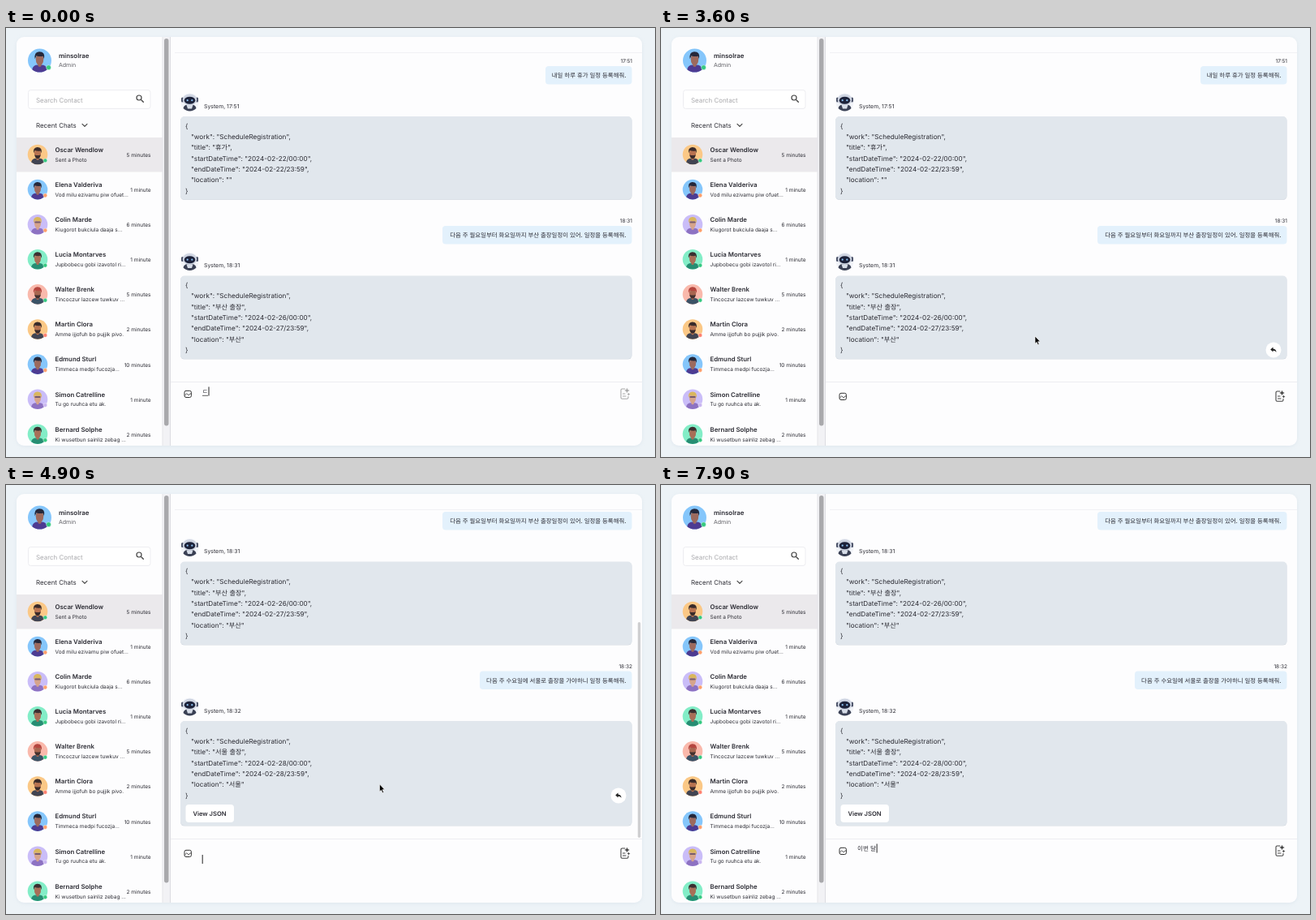
These frames come from a looping animation (800 by 529 pixels, 8 s). An HTML page:

```html
<!DOCTYPE html>
<html lang="ko">
<head>
<meta charset="utf-8">
<title>Schedule chat</title>
<style>
html, body { margin: 0; height: 100%; overflow: hidden; background: #edf3f7; }
svg { display: block; width: 100vw; height: 100vh; }
text { font-family: Inter, 'Noto Sans CJK KR', 'Noto Sans CJK', sans-serif; white-space: pre; text-rendering: geometricPrecision; }
</style>
</head>
<body>
<svg id="stage" viewBox="0 0 800 529"></svg>
<script>
const LOOP = 8000, SEND = 3550, ASK = 3650, REPLY = 3900, RETYPE = 6100;
const INK = '#2b2b33', GREEN = '#35c981', ORANGE = '#ffa06b';

const text = (x, y, size, str, attrs = '') =>
  `<text x="${x}" y="${y}" font-size="${size}" fill="${INK}" ${attrs}>${str}</text>`;
const rect = (x, y, w, h, r, fill, attrs = '') =>
  `<rect x="${x}" y="${y}" width="${w}" height="${h}" rx="${r}" fill="${fill}" ${attrs}/>`;
const circle = (x, y, r, fill, attrs = '') =>
  `<circle cx="${x}" cy="${y}" r="${r}" fill="${fill}" ${attrs}/>`;
const path = (d, attrs = '') =>
  `<path d="${d}" fill="none" stroke="#444" stroke-linecap="round" stroke-linejoin="round" ${attrs}/>`;
const END = 'text-anchor="end"', BOLD = 'font-weight="600"';

// Avatars: backdrop, hair, skin, shirt, beard or glasses colour
const LOOKS = {
  amber: ['#fbc886', '#3a2b2a', '#b87350', '#414452', '#3a2b2a'],
  blue: ['#85c6fb', '#25283b', '#9c6a5e', '#4d3b92', '#9c6a5e'],
  lilac: ['#cabdf8', '#d9b75d', '#d6a48c', '#8d72c2', '#775c6c'],
  mint: ['#83edc7', '#3b3031', '#a86f58', '#278d73', '#a86f58'],
  coral: ['#f9b9ac', '#b5463f', '#a86650', '#3b5266', '#43302f'],
};

function avatar(x, y, r, look, dot) {
  const [back, hair, skin, shirt, detail] = LOOKS[look];
  const face = look === 'lilac'
    ? rect(-.3, -.3, .6, .16, .07, detail)
    : `<path d="M-.3 .02Q0 .16 .3 .02Q.26 .42 0 .42Q-.26 .42-.3 .02" fill="${detail}"/>`;
  return `<g transform="translate(${x} ${y}) scale(${r})">${circle(0, 0, 1, back)}
    <path d="M-.64 .77Q-.58 .38-.15 .38H.15Q.58 .38 .64 .77A1 1 0 0 1-.64 .77" fill="${shirt}"/>
    ${rect(-.13, .18, .26, .36, .1, skin)}
    <ellipse cy="-.1" rx=".33" ry=".48" fill="${skin}"/>${face}
    <path d="M-.4-.12Q-.5-.7-.05-.74Q.5-.76 .38-.12L.28-.36Q0-.3-.28-.4Z" fill="${hair}"/></g>
    ${circle(x + r * .76, y + r * .6, r * .2, dot, 'stroke="#fff" stroke-width=".4"')}`;
}

const CONTACTS = [
  ['Oscar Wendlow', 'Sent a Photo', '5 minutes', 'amber', GREEN],
  ['Elena Valderiva', 'Vod milu ezivamu piw ofuet…', '1 minute', 'blue', ORANGE],
  ['Colin Marde', 'Kiugorot bukciula daaja s…', '6 minutes', 'lilac', ORANGE],
  ['Lucia Montarves', 'Jupbobecu gobi izavotol ri…', '1 minute', 'mint', GREEN],
  ['Walter Brenk', 'Tincoczur lazcew tuwkuv …', '5 minutes', 'coral', GREEN],
  ['Martin Clora', 'Amme ijjofuh bo pujjik pivo.', '2 minutes', 'amber', '#ff8170'],
  ['Edmund Sturl', 'Timmeca medpi fucozja…', '10 minutes', 'blue', ORANGE],
  ['Simon Catrelline', 'Tu go ruuhca etu ak.', '1 minute', 'lilac', '#c9b6f0'],
  ['Bernard Solphe', 'Ki wusetbun sainliz zebag …', '2 minutes', 'mint', GREEN],
];

const sidebar = () => avatar(41.5, 40, 14.5, 'blue', GREEN) +
  text(65, 36.6, 7.9, 'minsolrae', BOLD) +
  text(65, 48.3, 7, 'Admin', 'opacity=".75"') +
  rect(27.5, 76.5, 150.5, 23, 3, '#fff', 'stroke="#ededf1"') +
  text(37, 91.6, 7.9, 'Search Contact', 'opacity=".4"') +
  path('M167 89L169.3 91.3', 'stroke-width="1.4"') +
  circle(164, 86, 3, 'none', 'stroke="#444" stroke-width="1.2"') +
  text(37, 122.7, 7.9, 'Recent Chats') +
  path('M94 118.3L97 121.3L100 118.3', 'stroke-width="1.1"') +
  rect(13, 135, 180, 42.5, 0, '#ebe9ec') +
  CONTACTS.map(([name, note, ago, look, dot], i) => {
    const y = 156 + 43.1 * i;
    return avatar(39, y, 12.3, look, dot) + text(60.5, y - 3.2, 7.8, name, BOLD) +
      text(60.5, y + 8.7, 6.5, note) + text(178.5, y + 2.9, 6.5, ago, END);
  }).join('') +
  rect(193, 11, 10, 504, 0, '#f2f2f5') +
  rect(192.5, 11, 1, 504, 0, '#e6e6ea') + rect(202, 11, 1, 504, 0, '#dcdce1') +
  rect(195, 13, 5.5, 477.5, 2.7, '#a9a9ac');

const request = (top, left, time, str) => text(772, top - 3.7, 6.5, time, END) +
  rect(left, top, 771.5 - left, 22.5, 4, '#e3f1fc') +
  text(764.5, top + 14.1, 7.4, str, END + ' font-weight="500"');

const robot = y => `<g transform="translate(226.5 ${y})">${circle(0, 0, 11, '#f1f3f8')}
  <path d="M-8 7.5Q-7 2.5 0 2.5T8 7.5A11 11 0 0 1-8 7.5" fill="#3a4054"/>
  <path d="M-4 3.5H4L2.5 8H-2.5Z" fill="#d6dce7"/>
  ${rect(-10.5, -6, 3, 6, 1.5, '#4b5268')}${rect(7.5, -6, 3, 6, 1.5, '#4b5268')}
  <ellipse cy="-3" rx="8.7" ry="7" fill="#cfd5e2"/>
  <ellipse cy="-2.2" rx="6.8" ry="4.5" fill="#1c223a"/>
  ${circle(-2.8, -2.3, 1.1, '#8fc4f5')}${circle(2.8, -2.3, 1.1, '#8fc4f5')}</g>`;

const bubble = (top, h) => rect(215, top + .6, 556.5, h, 5, '#d3d9e1') + rect(215, top, 556.5, h, 5, '#e1e7ed');

function answer(top, h, time, title, from, to, place) {
  const lines = ['{', '"work": "ScheduleRegistration",', `"title": "${title}",`,
    `"startDateTime": "${from}/00:00",`, `"endDateTime": "${to}/23:59",`, `"location": "${place}"`, '}'];
  return robot(top - 17.5) + text(244, top - 10.2, 6.9, 'System, ' + time) + bubble(top, h) +
    lines.map((s, i) => text(i % 6 ? 228 : 221, top + 14.5 + 13.35 * i, 8.2, s)).join('');
}

const replyButton = (id, y) => `<g id="${id}">${circle(755, y, 9.5, '#fff')}
  <path d="M751.2 ${y - .4}l3.3-3v1.8q3.8 .3 4 4.4q-1.2-2-4-2v1.8z" fill="#222"/></g>`;

const thread = () => request(47, 665, '17:51', '내일 하루 휴가 일정 등록해줘.') +
  answer(109, 102.5, '17:51', '휴가', '2024-02-22', '2024-02-22', '') +
  request(244, 538, '18:31', '다음 주 월요일부터 화요일까지 부산 출장일정이 있어. 일정을 등록해줘.') +
  answer(305.5, 102.5, '18:31', '부산 출장', '2024-02-26', '2024-02-27', '부산') +
  replyButton('replyOld', 397) +
  `<g id="asked">${request(440.5, 584, '18:32', '다음 주 수요일에 서울로 출장을 가야하니 일정 등록해줘.')}</g>
  <g id="loading">${robot(484.5)}${bubble(502, 25.5)}${text(221, 517.5, 8.2, '...')}
    <rect id="progress" x="216" y="525.3" height="2.2" rx="1" fill="#4a6fa5"/></g>
  <g id="answered">${answer(502, 129, '18:32', '서울 출장', '2024-02-28', '2024-02-28', '서울')}
    ${rect(221.5, 605, 59.5, 22, 4, '#fff')}${text(251, 618.8, 7.6, 'View JSON', BOLD + ' text-anchor="middle"')}
    ${replyButton('replyNew', 594)}</g>`;

const composer = () => `<g id="icons">
  ${rect(220, 450.3, 8.4, 8.2, 2, 'none', 'stroke="#333"')}
  ${path('M220.5 456L222.8 453.8L225 455.8L228 453.5', 'stroke="#333" stroke-width=".9"')}
  <g id="sendIcon">${path('M763 448H759.5Q758 448 758 449.5V458.8Q758 460.3 759.5 460.3H765.5Q767 460.3 767 458.8V457.5M760.5 454H763M760.5 457H764', 'stroke-width="1.1"')}
    <path d="M765.5 446.7l1 2.3 2.3 1-2.3 1-1 2.3-1-2.3-2.3-1 2.3-1zM767.5 452.6l.6 1.4 1.4 .6-1.4 .6-.6 1.4-.6-1.4-1.4-.6 1.4-.6z" fill="#444"/></g>
  <g id="stopIcon">${circle(762, 454, 7, 'none', 'stroke="#555" stroke-width="1.6"')}${rect(759, 451, 6, 6, .6, '#444')}</g></g>
  ${text(242, 451, 7.6, '', 'id="typed"')}
  <path id="underline" stroke="#333" stroke-width=".8"/>
  <path id="caret" stroke="#222"/>`;

document.getElementById('stage').innerHTML = `
  <defs><clipPath id="card"><rect x="13" y="11" width="771" height="504" rx="9"/></clipPath>
  <clipPath id="view"><rect x="203" y="30.5" width="581" height="406"/></clipPath>
  <filter id="soft" x="-5%" y="-5%" width="110%" height="110%"><feGaussianBlur stdDeviation="2"/></filter></defs>
  ${rect(0, 0, 800, 529, 0, '#edf3f7')}
  ${rect(13, 12, 771, 504, 9, '#d5dfe8', 'filter="url(#soft)" opacity=".6"')}
  ${rect(13, 11, 771, 504, 9, '#fdfdfe')}
  <g clip-path="url(#card)">${sidebar()}
    ${rect(208, 30, 576, 1, 0, '#f1f1f4')}
    <g clip-path="url(#view)"><g id="thread">${thread()}</g></g>
    ${rect(203, 436, 581, 1, 0, '#ededf1')}
    <rect id="thumb" x="778.8" width="3.4" rx="1.7" fill="#b8b8bc"/>
    ${composer()}</g>
  <path id="arrow" d="M0 0V9.3L2.1 7.4L3.6 10.8L5.2 10.1L3.7 6.8H6.5Z" fill="#000" stroke="#fff" stroke-width=".7"/>
  <path id="beam" d="M-2.3-5.4Q0-5.4 0-4V4Q0 5.4-2.3 5.4M2.3-5.4Q0-5.4 0-4M0 4Q0 5.4 2.3 5.4M-1.2 1.8H1.2" fill="none" stroke="#222" stroke-width="1"/>`;

const el = {};
document.querySelectorAll('[id]').forEach(e => el[e.id] = e);
const show = (id, on) => el[id].setAttribute('visibility', on ? 'inherit' : 'hidden');
const set = (id, attrs) => { for (const k in attrs) el[id].setAttribute(k, attrs[k]); };

// Hangul input steps: each entry is [finished text, syllable being composed]
function keystrokes(str) {
  const BASE = 0xAC00, LEADS = 'ㄱㄲㄴㄷㄸㄹㅁㅂㅃㅅㅆㅇㅈㅉㅊㅋㅌㅍㅎ';
  const TAILS = [1, 2, 4, 7, 0, 8, 16, 17, 0, 19, 20, 21, 22, 0, 23, 24, 25, 26, 27];
  const glyph = code => String.fromCharCode(BASE + code);
  const steps = [];
  let done = '';
  for (const ch of str) {
    const code = ch.charCodeAt(0) - BASE;
    if (code < 0) {
      steps.push([done + ch, '']);
    } else {
      const lead = Math.floor(code / 588), tail = code % 28, open = code - tail;
      const prev = done.charCodeAt(done.length - 1) - BASE;
      // A new consonant first lands under an open syllable
      steps.push(prev >= 0 && prev % 28 === 0 && TAILS[lead]
        ? [done.slice(0, -1), glyph(prev + TAILS[lead])] : [done, LEADS[lead]]);
      if (Math.floor(code % 588 / 28) === 14) steps.push([done, glyph(open - 28)]);
      steps.push([done, glyph(open)]);
      if (tail) steps.push([done, ch]);
    }
    done += ch;
  }
  return steps;
}
const FIRST = keystrokes('다음 주 수요일에 서울로 출장을 가야하니 일정 등록해줘.');
const SECOND = keystrokes('이번 달');

const clamp = v => Math.max(0, Math.min(1, v));
const ease = v => v * v * (3 - 2 * v);

function drawInput(t) {
  const step = t < SEND ? FIRST[Math.min(FIRST.length - 1, Math.floor(t / 53.4))]
    : t >= RETYPE ? SECOND[Math.min(SECOND.length - 1, Math.floor((t - RETYPE) / 100))] : null;
  const [done, composing] = step || ['', ''];
  const width = s => { el.typed.textContent = s; return s ? el.typed.getComputedTextLength() : 0; };
  const from = 242 + width(done), to = 242 + width(done + composing);
  show('underline', composing && t < 7000);
  set('underline', { d: `M${from} 453.3H${to}` });
  const x = step ? to + 1 : 242.2;
  set('caret', { d: step ? `M${x} 442.5V453.5` : `M${x} 456V467` });
  show('caret', step ? t < 7400 || t >= 7900 : t >= ASK && Math.floor((t - 3600) / 500) % 2 === 0);
  set('icons', { transform: `translate(0 ${step ? -3 : 0})` });
}

function drawPointer(t) {
  const a = ease(clamp((t - 3600) / 100)), b = ease(clamp((t - 4800) / 500));
  const x = 461 + 6 * a - 62 * b, y = 380 - 23 * a + 112 * b;
  const seen = t >= SEND && t < RETYPE, typing = y > 436;
  show('arrow', seen && !typing);
  show('beam', seen && typing);
  set('arrow', { transform: `translate(${x} ${y})` });
  set('beam', { transform: `translate(${x} ${y})` });
  show('replyOld', seen && t < ASK);
  show('replyNew', seen && t >= REPLY && y < 420);
}

function render(t) {
  const asked = t >= ASK, answered = t >= REPLY, loading = asked && !answered;
  show('asked', asked);
  show('loading', loading);
  show('answered', answered);
  show('stopIcon', loading);
  show('sendIcon', !loading);
  set('sendIcon', { opacity: .45 + .55 * clamp(t / 300) });
  set('progress', { width: 13 + Math.max(0, t - 3700) * .4 });
  set('thread', { transform: `translate(0 ${answered ? -211 : asked ? -107.5 : 0})` });
  const top = answered ? 169 : 115;
  show('thumb', asked);
  set('thumb', { y: top, height: 435 - top, opacity: 1 - clamp((t - 4800) / 300) });
  drawPointer(t);
  drawInput(t);
}

const start = performance.now();
function tick() {
  render((performance.now() - start) % LOOP);
  requestAnimationFrame(tick);
}
tick();
</script>
</body>
</html>
```
